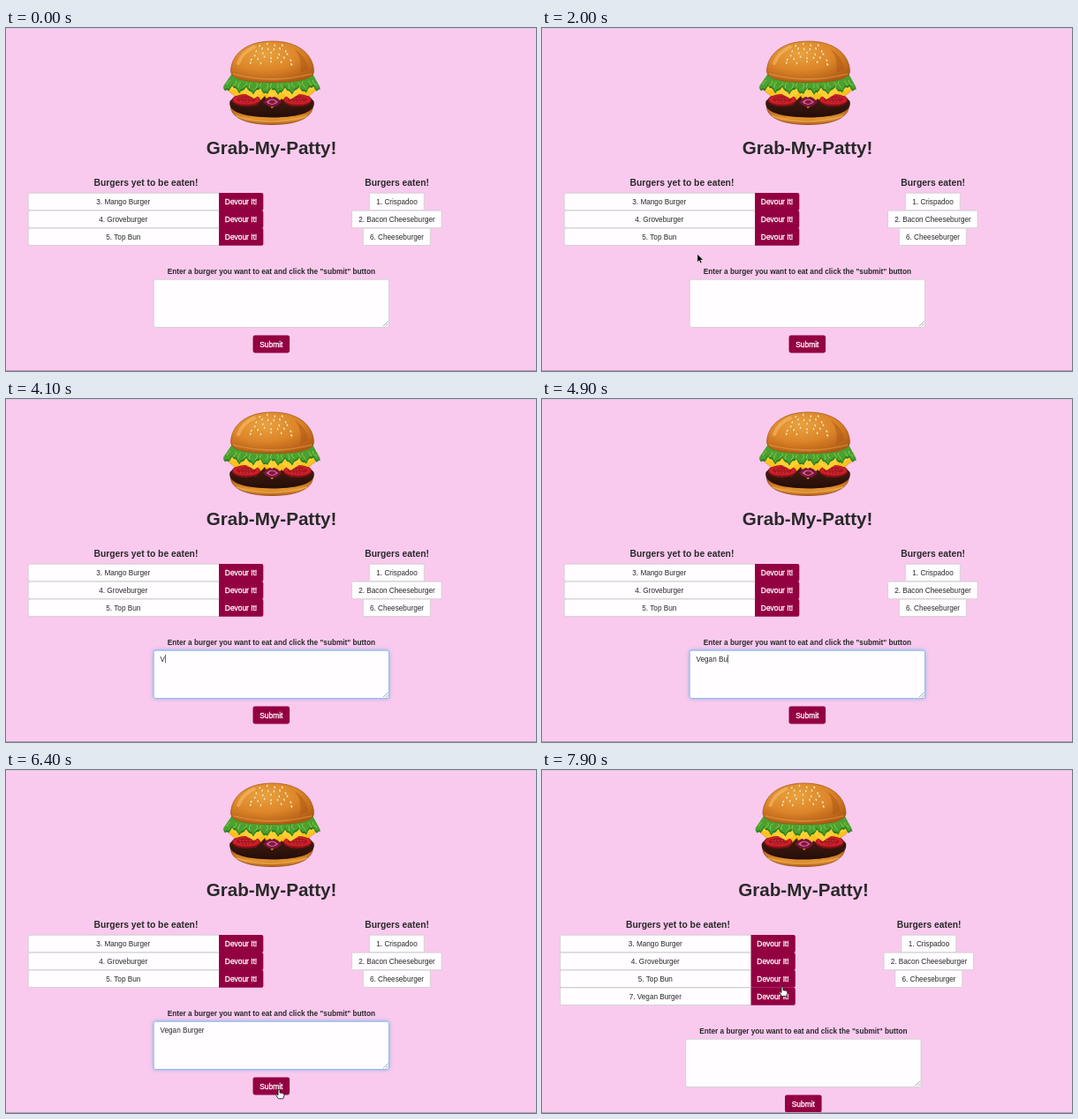
Recreate the animation shown at these times as an HTML page. Size 600 by 389 pixels, loop 8 s.

```html
<!DOCTYPE html>
<html lang="en">
<head>
<meta charset="utf-8">
<title>Burger list</title>
<style>
  html, body { margin: 0; width: 100%; height: 100%; overflow: hidden; background: #f9caee; }
  svg { display: block; width: 100vw; height: 100vh; }
  text { font: 8.2px "Liberation Sans", Arial, sans-serif; fill: #292929; }
  .mid { text-anchor: middle; }
  .bold { font-size: 8.23px; font-weight: bold; }
  .h1 { font-size: 20.6px; font-weight: bold; }
  .h4 { font-size: 10.3px; font-weight: bold; }
  .btn { font-size: 8.4px; fill: #fff; stroke: #fff; stroke-width: .3px; }
  .box { fill: #fffdff; stroke: #ccc; stroke-width: .8; }
  .red { fill: #930042; }
  .focus { stroke: #7fb2e6; filter: drop-shadow(0 0 2px rgba(90, 165, 233, .75)); }
</style>
</head>
<body>
<svg viewBox="0 0 600 389" preserveAspectRatio="none">
  <defs>
    <radialGradient id="bun" cx=".4" cy=".3" r=".75">
      <stop offset="0" stop-color="#eba23d"/>
      <stop offset=".55" stop-color="#dc8529"/>
      <stop offset="1" stop-color="#b05b15"/>
    </radialGradient>
    <linearGradient id="base" x2="0" y2="1">
      <stop offset=".3" stop-color="#c06c1c"/>
      <stop offset=".7" stop-color="#e2932f"/>
      <stop offset="1" stop-color="#b9651b"/>
    </linearGradient>
    <linearGradient id="meat" x2="0" y2="1">
      <stop offset="0" stop-color="#48200f"/>
      <stop offset="1" stop-color="#240d09"/>
    </linearGradient>
    <g id="tomato">
      <ellipse rx="16" ry="7" fill="#8d0f18"/>
      <ellipse cy="-.8" rx="15" ry="5.600" fill="#cc2029"/>
      <ellipse cy="-1" rx="11" ry="3.500" fill="#a81420"/>
      <path d="M-8-2h16M-7 1h14" stroke="#e0524a" stroke-width=".8" stroke-dasharray="2 1.6"/>
    </g>
  </defs>
  <rect width="600" height="389" fill="#f9caee"/>
  <g id="page">
    <g id="burger">
      <path d="M254.500 87C253 101 271 109.500 301 109.500C331 109.500 348 101 347.500 87Z" fill="url(#base)" stroke="#8a4310" stroke-width=".8"/>
      <path d="M260 100Q299 112 341 100" fill="none" stroke="#f2b65b" stroke-width="1.600" opacity=".6"/>
      <path d="M253.500 83C251 93 263 101 301 101.500C339 101 351 93 348.500 83L340 74H262Z" fill="url(#meat)"/>
      <path d="M249 69L268 84 283 87 293 77 301 91 312 80 323 88 335 83 353 69 338 63H264Z" fill="#fcc21f" stroke="#d98b0b" stroke-width=".6"/>
      <use href="#tomato" x="272" y="82"/>
      <use href="#tomato" x="330" y="82"/>
      <path d="M291 84Q301 71 312 84Q302 95 291 84Z" fill="#7d123c"/>
      <path d="M294.500 84Q301 77 308 84Q301 90 294.500 84Z" fill="#cc7695"/>
      <path d="M297 84Q301 79 306 84Q301 88 297 84Z" fill="#85133f"/>
      <path d="M250 68L266 72 281 80 291 73 301 79 312 73 322 81 335 73 352 68 337 63H264Z" fill="#ffcf32"/>
      <path id="lettuceShade" fill="#277a22"/>
      <path id="lettuce" fill="#4ba12f"/>
      <path id="veins" fill="none" stroke="#8fcf55" stroke-width=".9"/>
      <path d="M254.500 48C256 28 274 15 301.500 15C329 15 347 28 348.500 48C349 56 339 61.500 302 61.500C264 61.500 254 56 254.500 48Z" fill="url(#bun)" stroke="#9c5111" stroke-width=".7"/>
      <path d="M257 52Q301 64 346 52" fill="none" stroke="#eaa348" stroke-width="1.800" opacity=".5"/>
      <path d="M263 40Q268 27 281 21.500" fill="none" stroke="#ffd387" stroke-width="4" stroke-linecap="round" opacity=".4"/>
      <path d="M327 24Q341 33 342 47L333 51Q336 35 327 24Z" fill="#a85412" opacity=".45"/>
      <g id="seeds" fill="#ffe7ae" stroke="#bc711e" stroke-width=".35"></g>
    </g>
    <text class="mid h1" x="300.600" y="143">Grab-My-Patty!</text>
    <text class="mid h4" x="158.400" y="179.200">Burgers yet to be eaten!</text>
    <text class="mid h4" x="442.600" y="179.200">Burgers eaten!</text>
    <g id="lists"></g>
    <g id="form">
      <text class="mid bold" x="300.400" y="279">Enter a burger you want to eat and click the "submit" button</text>
      <rect id="field" class="box" x="167.200" y="285.200" width="266.300" height="54.300" rx="2.300"/>
      <path d="M427 338.200l5.500-5.500M430 338.200l2.500-2.500" stroke="#666" stroke-width=".6"/>
      <text id="typed" x="174.500" y="297.600"></text>
      <rect id="caret" y="290" width=".7" height="9.500" fill="#333"/>
      <rect class="red" x="279.500" y="348.400" width="41.600" height="20" rx="2.300"/>
      <text class="mid btn" x="300.300" y="361.500">Submit</text>
    </g>
  </g>
  <rect width="600" height="1" fill="#dcc5df"/>
  <rect y="388" width="600" height="1" fill="#b99bb2"/>
  <g id="pointer">
    <path id="arrow" d="M0 0v9.400l2.200-2 1.400 3.300 1.700-.7-1.400-3.200h3z" fill="#000" stroke="#fff" stroke-width=".6"/>
    <path id="ibeam" d="M-2.200-4.500Q0-4.500 0-3.200Q0-4.500 2.200-4.500M0-3.200V3.400M-1.200.8H1.200M-2.200 4.500Q0 4.500 0 3.200Q0 4.500 2.200 4.500" fill="none" stroke="#222" stroke-width="1"/>
    <path id="hand" d="M-1 .5Q0-.8 1 .5V4Q2 3.200 2.700 4.200Q3.700 3.600 4.300 4.600Q5.600 4.400 5.800 5.600V7.500L4.800 10.500H-.6L-3.400 6.200Q-3 4.800-1 6.500Z" fill="#fff" stroke="#111" stroke-width=".8"/>
  </g>
</svg>
<script>
const $ = id => document.getElementById(id);
const LOOP = 8000, CLICK = 2700, TYPE_START = 4000, KEY_MS = 125, SUBMIT = 6500;
const ENTRY = "Vegan Burger", TYPE_END = TYPE_START + ENTRY.length * KEY_MS;

// Static parts
const label = (x, y, text, cls = "") => `<text class="mid ${cls}" x="${x}" y="${y}">${text}</text>`;

function pendingRow(name, i) {
  const y = 187.2 + i * 19.9;
  return `<g id="row${i}">
    <rect class="box" x="25.2" y="${y}" width="218" height="19.6" rx="2"/>
    <path class="red" d="M241 ${y - .2}h48.300q2 0 2 2v16q0 2-2 2h-48.300z"/>
    ${label(132.8, y + 12.7, name)}${label(266, y + 12.7, "Devour It!", "btn")}</g>`;
}

function eatenRow([name, width], i) {
  const y = 187.2 + i * 19.9;
  return `<rect class="box" x="${442.3 - width / 2}" y="${y}" width="${width}" height="19.6" rx=".6"/>`
    + label(442.5, y + 12.7, name);
}

$("lists").innerHTML =
  ["3. Mango Burger", "4. Groveburger", "5. Top Bun", "7. " + ENTRY].map(pendingRow).join("") +
  [["1. Crispadoo", 62], ["2. Bacon Cheeseburger", 101.5], ["6. Cheeseburger", 76]].map(eatenRow).join("");

// Ruffled leaf edge
function leaf(drop) {
  let d = "M257 50";
  for (let i = 0; i <= 55; i++) {
    const u = i / 27.5 - 1;
    const y = 70 + drop - 4 * u * u + 2.8 * Math.sin(i * .85) + 1.4 * Math.sin(i * 2.3);
    d += `L${(301 + 55 * u).toFixed(1)} ${y.toFixed(1)}`;
  }
  return d + "L346 50Z";
}
$("lettuceShade").setAttribute("d", leaf(2));
$("lettuce").setAttribute("d", leaf(0));
$("veins").setAttribute("d", Array.from({ length: 17 }, (_, i) => {
  const u = i / 8 - 1;
  return `M${301 + 47 * u} ${63 - 4 * u * u}q${i % 2 ? 3 : -3} 2 ${4 * u} ${5 + i % 3}`;
}).join(""));

let seeds = "";
for (let row = 0; row < 5; row++) {
  const count = 4 + row % 2 * 2 + (row > 1);
  for (let i = 0; i < count; i++) {
    const u = (i + .5) / count * 2 - 1;
    const x = 300 + u * (17 + row * 3), y = 18.5 + row * 5 + 3 * u * u + Math.sin(i * 4 + row);
    seeds += `<ellipse rx="1.1" ry="1.7" transform="translate(${x} ${y}) rotate(${u * -40})"/>`;
  }
}
$("seeds").innerHTML = seeds;

// Pointer path: time, x, y
const path = [
  [300, -8, 268], [900, 87, 241], [1100, 100.5, 238], [1800, 150, 247], [2500, 280, 294],
  [5700, 280, 294], [6200, 309, 363], [6500, 309, 362], [6800, 310, 349],
  [7200, 310, 349], [7800, 272, 246], [8000, 272, 246]
];

function pointerAt(t) {
  const i = path.findIndex(p => p[0] > t);
  if (i < 1) return path[0].slice(1);
  const [a, b] = [path[i - 1], path[i]];
  const u = (t - a[0]) / (b[0] - a[0]), k = u * u * (3 - 2 * u);
  return [a[1] + (b[1] - a[1]) * k, a[2] + (b[2] - a[2]) * k];
}

const show = (id, on) => $(id).setAttribute("visibility", on ? "visible" : "hidden");
const inside = (x, y, l, t, r, b) => x >= l && x <= r && y >= t && y <= b;

function render(time) {
  const t = Math.floor(time / 100) * 100;
  const sent = t >= SUBMIT, shift = sent ? -4.5 : 0, drop = sent ? 20 : 0;
  $("page").setAttribute("transform", `translate(${shift} 0)`);
  $("form").setAttribute("transform", `translate(0 ${drop})`);
  show("row3", sent);

  const focused = t >= CLICK && !sent;
  $("field").classList.toggle("focus", focused);
  const count = Math.floor((t - TYPE_START) / KEY_MS) + 1;
  const typed = $("typed");
  typed.textContent = sent ? "" : ENTRY.slice(0, Math.max(0, count));
  const typing = t >= TYPE_START && t < TYPE_END;
  const since = t - (t < TYPE_START ? CLICK : TYPE_END);
  show("caret", focused && (typing || since % 1000 < 500));
  $("caret").setAttribute("x", 174.7 + (typed.textContent ? typed.getComputedTextLength() : 0));

  const [x, y] = pointerAt(t);
  const px = x - shift, py = y - drop;
  const onButton = inside(px, py, 279, 348, 321, 369) || inside(px, y, 241, 187, 291, sent ? 267 : 247);
  const onField = inside(px, py, 167, 285, 434, 340);
  const kind = onButton ? "hand" : onField ? "ibeam" : "arrow";
  const visible = t >= 300 && !(t >= TYPE_START - 100 && t < 5700);
  for (const id of ["arrow", "ibeam", "hand"]) show(id, visible && id === kind);
  $("pointer").setAttribute("transform", `translate(${x} ${y})`);
}

const start = performance.now();
function tick(now) {
  render(Math.max(0, now - start) % LOOP);
  requestAnimationFrame(tick);
}
render(0);
requestAnimationFrame(tick);
</script>
</body>
</html>
```
